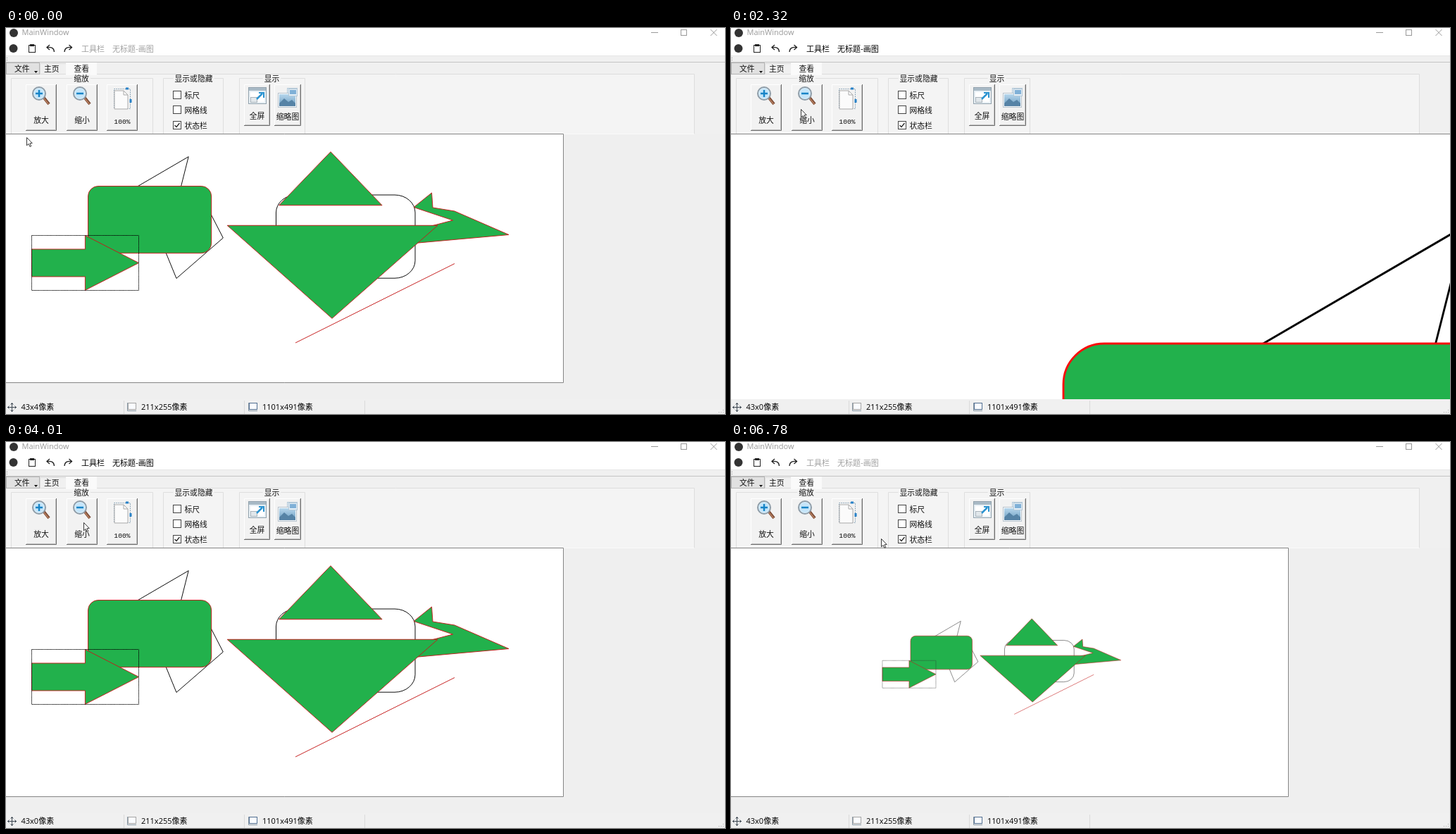
These frames come from a looping animation (1021x548 px, 6980 ms). An HTML page with a canvas:

```html
<!DOCTYPE html>
<html lang="zh">
<head>
<meta charset="utf-8">
<title>MainWindow</title>
<style>
html, body { margin: 0; width: 100%; height: 100%; overflow: hidden; background: #f0f0f0; }
canvas { display: block; }
</style>
</head>
<body>
<canvas id="stage" width="1021" height="548"></canvas>
<script>
const ctx = document.getElementById('stage').getContext('2d');
const LOOP = 6980, STEP = 70;
const GREEN = '#22b14c', PANEL = '#f4f4f4', FACE = '#f0f0f0';
const SANS = '"Open Sans", "Noto Sans CJK SC", "Noto Sans CJK", sans-serif';
const CJK = '"Noto Sans CJK SC", "Noto Sans CJK", sans-serif';
const MONO = '"Liberation Mono", monospace';

// [start, page zoom, shape zoom, shift x, shift y]
const VIEWS = [
  [0, 1, 1, 0, 0], [770, 2, 2, 0, 0], [1640, 4, 4, 0, 0], [2460, 2, 2, 0, 0],
  [3000, 1, 1, 0, 0], [4080, .5, .5, 0, 0], [5550, 1, .5, 197.7, 88]
];
// [start, number of steps, end x, end y]
const MOVES = [
  [70, 10, 40, 124], [1780, 4, 99, 115], [3330, 9, 110, 114], [4540, 7, 151, 116],
  [5150, 2, 153, 115], [6010, 7, 214, 137], [6500, 3, 221, 128], [6710, 2, 213, 137]
];

function box(x, y, w, h, color) {
  ctx.fillStyle = color;
  ctx.fillRect(x, y, w, h);
}

function text(str, x, y, { size = 10.8, font = CJK, color = '#111', align = 'left' } = {}) {
  ctx.font = `${size}px ${font}`;
  ctx.textAlign = align;
  ctx.textBaseline = 'middle';
  ctx.fillStyle = color;
  ctx.fillText(str, x, y);
}

function path(points, closed) {
  ctx.beginPath();
  points.forEach(([x, y]) => ctx.lineTo(x, y));
  if (closed) ctx.closePath();
}

function line(points, color, width = 1) {
  path(points);
  ctx.strokeStyle = color;
  ctx.lineWidth = width;
  ctx.stroke();
}

function frame(x, y, w, h, color, fill) {
  if (fill) box(x, y, w, h, fill);
  ctx.strokeStyle = color;
  ctx.lineWidth = 1;
  ctx.strokeRect(x + .5, y + .5, w - 1, h - 1);
}

function disc(x, y, r, fill, stroke, width = 1) {
  ctx.beginPath();
  ctx.arc(x, y, r, 0, 7);
  ctx.fillStyle = fill;
  ctx.fill();
  if (!stroke) return;
  ctx.strokeStyle = stroke;
  ctx.lineWidth = width;
  ctx.stroke();
}

function drawShapes(zoom, dx, dy) {
  const pen = zoom === 1 ? .95 : .72 * zoom + (zoom < 1 ? .2 : 0);
  const red = zoom > 1 ? '#f80c0c' : '#c41a1a';
  const ink = zoom < 1 ? '#333' : '#000';
  const stroke = color => {
    ctx.strokeStyle = color;
    ctx.lineWidth = pen / zoom;
    ctx.stroke();
  };
  const solid = points => {
    if (points) path(points, true);
    ctx.fillStyle = GREEN;
    ctx.fill();
    stroke(red);
  };
  const round = (x, y, w, h, rx, ry) => {
    ctx.beginPath();
    ctx.roundRect(x, y, w, h, { x: rx, y: ry });
  };

  ctx.save();
  ctx.translate(dx - 2, dy + 150);
  ctx.scale(zoom, zoom);
  ctx.translate(2, -150);

  path([[184, 226.5], [259.2, 182.7], [247.5, 229]]);
  stroke(ink);
  path([[289, 260.5], [308.3, 298], [242, 355.5], [226, 316.5]]);
  stroke(ink);
  round(116.5, 224.5, 175.2, 95.2, 14.5, 14.5);
  solid();
  solid([[36.5, 314], [112.4, 314], [112.4, 294.5], [188.5, 333.5], [112.4, 372.3], [112.4, 353], [36.5, 353]]);
  ctx.setLineDash([1.44, .72]);
  path([[36.5, 294.5], [188.5, 294.5], [188.5, 372.5], [36.5, 372.5]], true);
  stroke(ink);
  ctx.setLineDash([]);

  round(383.5, 237, 197.5, 118.2, 29, 25);
  stroke(ink);
  solid([[604.5, 234], [606, 255], [637, 260], [714, 293.5], [570, 306.4], [570, 290], [634.5, 273], [579, 254.5]]);
  solid([[461, 175.7], [534, 251.7], [387.7, 251.7]]);
  solid([[314.2, 280.3], [613, 280.3], [463, 412.3]]);
  path([[411, 447], [637, 334.5]]);
  stroke(red);
  ctx.restore();
}

function drawPage([, page, zoom, dx, dy]) {
  const right = 793 * page - 2, bottom = 353 * page + 150;
  ctx.save();
  ctx.beginPath();
  ctx.rect(0, 150, 1021, 377);
  ctx.clip();
  box(0, 150, 1021, 377, '#efefef');
  box(0, 150, 977, 1, '#fafafa');
  box(0, 150, right, bottom - 150, '#fff');
  drawShapes(zoom, dx, dy);
  const r = Math.floor(right) + .5, b = Math.floor(bottom) + .5;
  line([[0, 150.5], [r, 150.5], [r, b], [0, b]], '#858585');
  ctx.restore();
}

function drawTitle(active) {
  box(0, 0, 1021, 39, '#fff');
  disc(11, 7, 6, '#333');
  disc(10.5, 29, 6, '#333');
  text('MainWindow', 22.5, 7, { size: 11, font: SANS, color: '#999' });
  line([[916, 6.5], [926, 6.5]], '#999');
  frame(958, 2, 9, 9, '#999');
  line([[1000.5, 2], [1009.5, 11]], '#999');
  line([[1009.5, 2], [1000.5, 11]], '#999');

  frame(32, 24, 10, 11, '#222');
  box(34, 23, 6, 3, '#222');
  const bend = (x, dir) => {
    line([[x + 4 * dir, 24], [x, 27.5], [x + 4 * dir, 31]], '#222', 1.3);
    ctx.beginPath();
    ctx.moveTo(x, 27.5);
    ctx.bezierCurveTo(x + 7 * dir, 27, x + 10 * dir, 28, x + 10.5 * dir, 34);
    ctx.stroke();
  };
  bend(58, 1);
  bend(93.5, -1);
  const style = { size: 11, color: active ? '#000' : '#a0a0a0' };
  text('工具栏', 107, 30, style);
  text('无标题-画图', 151, 30, style);
}

function magnifier(x, plus) {
  line([[x + 6, 98], [x + 14, 108]], '#7b4a35', 4);
  line([[x + 7, 100], [x + 13.5, 108]], '#b98262', 1.5);
  disc(x, 93, 9, '#d9effc', '#8f9da8', 2);
  disc(x, 93, 7, '#c5e5f9');
  line([[x - 5, 93], [x + 5, 93]], '#1684c7', 2.5);
  if (plus) line([[x, 88], [x, 98]], '#1684c7', 2.5);
}

function pageIcon() {
  ctx.setLineDash([1.5, 1.5]);
  frame(153, 86, 24, 29, '#7796ad');
  ctx.setLineDash([]);
  path([[154, 89], [167, 89], [173, 95], [173, 115], [154, 115]], true);
  ctx.fillStyle = '#fbfbfb';
  ctx.fill();
  ctx.strokeStyle = '#a9a9a9';
  ctx.lineWidth = 1;
  ctx.stroke();
  line([[167, 89], [167, 95], [173, 95]], '#aaa');
  line([[170, 86], [174, 86]], '#2882c8', 3);
  line([[177, 101], [177, 106]], '#2882c8', 3);
}

function screenIcon() {
  frame(344, 84, 26, 24, '#92a2ad', '#e8f0f5');
  box(345, 85, 24, 4, '#a9bac6');
  box(347, 91, 20, 14, '#fff');
  frame(347, 98, 10, 8, '#aab4bb', '#e1e7eb');
  line([[356, 101], [364, 93]], '#2c94d1', 2.5);
  line([[359, 92], [366, 92], [366, 99]], '#2c94d1', 2);
}

function pictureIcon() {
  frame(399, 85, 15, 12, '#b5c9d8', '#e4eff7');
  box(402, 88, 9, 6, '#7eafd5');
  frame(386, 92, 27, 21, '#b7c3cd', '#f8fafb');
  const sky = ctx.createLinearGradient(0, 94, 0, 111);
  sky.addColorStop(0, '#b7d7ed');
  sky.addColorStop(1, '#6c9dc0');
  box(388, 94, 23, 17, sky);
  path([[388, 107], [395, 100], [401, 105], [406, 102], [411, 107], [411, 111], [388, 111]], true);
  ctx.fillStyle = '#5683a6';
  ctx.fill();
  frame(401, 86, 13, 11, '#b5c9d8', '#e4eff7');
  box(403, 88, 9, 6, '#80b0d7');
}

function button(x, w, h, label, y, font = CJK) {
  box(x, 80, w, h, '#f2f2f2');
  line([[x + .5, 80 + h], [x + .5, 80.5], [x + w, 80.5]], '#fff');
  line([[x, 79.5 + h], [x + w - .5, 79.5 + h], [x + w - .5, 80]], '#6e6e6e');
  line([[x + 1, 78.5 + h], [x + w - 1.5, 78.5 + h], [x + w - 1.5, 81]], '#c2c2c2');
  text(label, x + w / 2, y, { align: 'center', font, size: font === MONO ? 9.7 : 10.8 });
}

function group(x, right, label, middle) {
  line([[x + .5, 150], [x + .5, 71.5], [right - .5, 71.5], [right - .5, 150]], '#dedede');
  const half = label.length * 5.4 + 2;
  box(middle - half, 66, half * 2, 12, PANEL);
  text(label, middle, 72, { align: 'center' });
}

function drawRibbon() {
  box(0, 39, 1021, 111, FACE);
  box(0, 39, 1021, 1, '#e6e6e6');
  box(0, 48, 1021, 1, '#c4c4c4');
  box(1, 42, 1, 1, '#999');
  box(1, 45, 1, 1, '#999');
  box(0, 65, 978, 85, PANEL);
  line([[129, 65.5], [977.5, 65.5], [977.5, 150]], '#dcdcdc');
  frame(0, 49, 48, 17, '#b4b4b4', '#e1e1e1');
  frame(48, 50, 38, 16, '#dcdcdc', '#f0f0f0');
  box(85, 49, 44, 18, '#fafafa');
  text('文件', 12, 58);
  text('主页', 54, 58);
  text('查看', 96.5, 58);
  path([[40, 61], [45, 61], [42.5, 64]], true);
  ctx.fillStyle = '#111';
  ctx.fill();

  group(7, 209, '缩放', 107);
  group(223, 309, '显示或隐藏', 266.5);
  group(331, 425, '显示', 377.5);
  button(28, 44, 66, '放大', 131);
  button(86, 44, 66, '缩小', 131);
  button(143, 44, 66, '100%', 133, MONO);
  button(338, 37, 59, '全屏', 125);
  button(381, 38, 59, '缩略图', 126);
  magnifier(47, true);
  magnifier(105, false);
  pageIcon();
  screenIcon();
  pictureIcon();

  ['标尺', '网格线', '状态栏'].forEach((label, i) => {
    const y = 89 + i * 21.5 | 0;
    frame(237, y, 12, 12, '#444', '#fff');
    text(label, 253.5, y + 6.5);
  });
  line([[239.5, 138], [242, 140.5], [246.5, 135]], '#222', 1.2);
}

function drawStatus(position) {
  box(0, 527, 1021, 21, FACE);
  [167, 338, 509].forEach(x => box(x, 529, 1, 19, '#dadada'));
  const style = { size: 11, font: SANS, color: '#000' };
  text(position, 21.5, 539, style);
  text('211x255像素', 192, 539, style);
  text('1101x491像素', 364, 539, style);

  line([[2, 538.5], [15, 538.5]], '#3c4650');
  line([[8.5, 532], [8.5, 545]], '#3c4650');
  for (const d of [-1, 1]) {
    line([[8.5 + 4 * d, 536.5], [8.5 + 6 * d, 538.5], [8.5 + 4 * d, 540.5]], '#3c4650');
    line([[6.5, 538.5 + 4 * d], [8.5, 538.5 + 6 * d], [10.5, 538.5 + 4 * d]], '#3c4650');
  }
  [[172, '#a5a5a5'], [344, '#526f91']].forEach(([x, color]) => {
    frame(x + 1, 532, 12, 10, color, '#fafcff');
    line([[x + .5, 532], [x + .5, 543.5], [x + 13, 543.5]], '#8b9ba8');
  });
  for (let i = 0; i < 3; i++) box(1018 - i * 3, 545, 1, 1, '#aaa');
  box(1018, 542, 1, 1, '#aaa');
}

function cursorAt(t) {
  let x = 29, y = 155;
  for (const [start, steps, endX, endY] of MOVES) {
    if (t < start) break;
    const p = Math.min(1, (Math.floor((t - start) / STEP) + 1) / steps);
    x += (endX - x) * p;
    y += (endY - y) * p;
  }
  return [x, y];
}

function drawCursor([x, y]) {
  ctx.save();
  ctx.translate(Math.round(x) + .5, Math.round(y) + .5);
  path([[0, 0], [0, 11.3], [2.6, 9], [4.5, 13], [6.3, 12.2], [4.4, 8.3], [7.7, 8]], true);
  ctx.fillStyle = '#fff';
  ctx.fill();
  ctx.strokeStyle = '#222';
  ctx.lineWidth = .9;
  ctx.stroke();
  ctx.restore();
}

function draw(t) {
  drawTitle(t >= 770 && t < 4080);
  drawRibbon();
  drawPage(VIEWS.findLast(view => t >= view[0]));
  drawStatus(t < 140 ? '43x4像素' : '43x0像素');
  drawCursor(cursorAt(t));
}

let origin;
function tick(now) {
  origin ??= now;
  draw((now - origin) % LOOP);
  requestAnimationFrame(tick);
}
draw(0);
requestAnimationFrame(tick);
</script>
</body>
</html>
```
